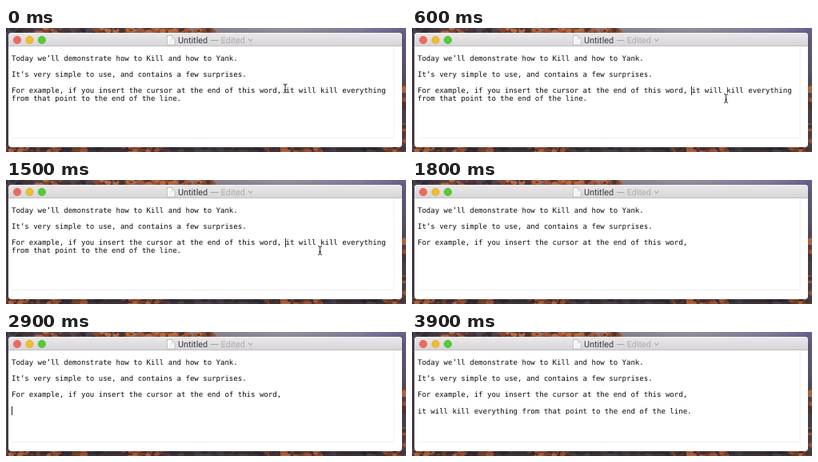
Animation, 500 px wide and 155 px high, one loop 4000 ms. Source, as an HTML page:

```html
<!DOCTYPE html>
<html lang="en">
<head>
<meta charset="utf-8">
<title>Kill and Yank</title>
<style>
  html, body { margin: 0; width: 100%; height: 100%; overflow: hidden; background: #37353f; }
  svg { display: block; width: 500px; height: 155px; }
  text { text-rendering: geometricPrecision; }
  #page { font: 9.04px "DejaVu Sans Mono", monospace; fill: #0a0a0a; }
  #title { font: 10.8px Roboto, Inter, sans-serif; }
</style>
</head>
<body>
<svg viewBox="0 0 500 155" xmlns="http://www.w3.org/2000/svg">
  <defs>
    <linearGradient id="sky">
      <stop offset="0" stop-color="#4b4354"/>
      <stop offset=".15" stop-color="#51434b"/>
      <stop offset=".5" stop-color="#85808a"/>
      <stop offset=".7" stop-color="#938c9b"/>
      <stop offset=".88" stop-color="#82799a"/>
      <stop offset="1" stop-color="#69608a"/>
    </linearGradient>
    <linearGradient id="side" x2="0" y2="1">
      <stop offset="0" stop-color="#69608a"/>
      <stop offset=".35" stop-color="#5d5472"/>
      <stop offset=".6" stop-color="#4a3f4b"/>
      <stop offset="1" stop-color="#50424a"/>
    </linearGradient>
    <linearGradient id="bar" x2="0" y2="1">
      <stop offset="0" stop-color="#ebe9eb"/>
      <stop offset="1" stop-color="#d5d3d5"/>
    </linearGradient>
    <filter id="soft" x="-5%" y="-10%" width="110%" height="125%">
      <feGaussianBlur stdDeviation="3"/>
    </filter>
    <path id="beam" d="M-2.5-5.500q2.500 0 2.500 2q0-2 2.500-2M0-4V4M-2.500 5.500q2.500 0 2.500-2q0 2 2.500 2M-1.500 2h3"/>
  </defs>

  <rect width="500" height="155" fill="url(#sky)"/>
  <rect y="145" width="500" height="10" fill="#403840"/>
  <rect width="5" height="155" fill="#4b4350"/>
  <rect x="490" width="10" height="155" fill="url(#side)"/>
  <g id="leaves"></g>
  <rect x="3" y="9" width="492" height="143" rx="4" opacity=".3" filter="url(#soft)"/>

  <path d="M3 23V10q0-4 4-4H491q4 0 4 4V145q0 4-4 4H7q-4 0-4-4Z" fill="#fff"/>
  <path d="M3 23V10q0-4 4-4H491q4 0 4 4V23Z" fill="url(#bar)"/>
  <path d="M3 22.500H495" stroke="#c3c1c3"/>
  <path d="M6 6.500H492" stroke="#f5f4f5"/>
  <g stroke-width=".6">
    <circle cx="14" cy="15" r="4.700" fill="#ed6a5d" stroke="#d5584c"/>
    <circle cx="29.500" cy="15" r="4.700" fill="#f0bd30" stroke="#d6a328"/>
    <circle cx="44.800" cy="15" r="4.700" fill="#54cb35" stroke="#43b02a"/>
  </g>
  <path d="M201.500 9.500h6l3.500 3.500v8h-9.500z" fill="#fff" stroke="#b4b4b4" stroke-width=".8"/>
  <path d="M207.500 9.500v3.500h3.500" fill="#eee" stroke="#b4b4b4" stroke-width=".7"/>
  <path d="M203.500 14.500h5.500m-5.500 2h5.500m-5.500 2h5.500" stroke="#d6d6d6" stroke-width=".6"/>
  <g id="title">
    <text x="215" y="18.800" fill="#3c3b3c">Untitled</text>
    <text x="268.800" y="18.800" fill="#adabad">Edited</text>
  </g>
  <path d="M256 15.500h9.500" stroke="#a5a4a5"/>
  <path d="M303 13.700l2.700 2.700 2.700-2.700" fill="none" stroke="#adabad" stroke-width="1.100"/>
  <path d="M485 23V137.500H8" fill="none" stroke="#dcdcdc" stroke-dasharray="1 1"/>

  <g id="page">
    <text x="7" y="41">Today we’ll demonstrate how to Kill and how to Yank.</text>
    <text x="7" y="61">It’s very simple to use, and contains a few surprises.</text>
    <text x="7" y="81">For example, if you insert the cursor at the end of this word,<tspan id="tail"> it will kill everything</tspan></text>
    <text id="wrap" x="7" y="91">from that point to the end of the line.</text>
    <text id="yank" x="7" y="101.500">it will kill everything from that point to the end of the line.</text>
  </g>
  <rect id="caret" width="1" height="11" fill="#222"/>
  <g id="mouse" fill="none">
    <use href="#beam" stroke="#fff" stroke-width="2.200" opacity=".8"/>
    <use href="#beam" stroke="#25252c"/>
  </g>
</svg>
<script>
const LOOP = 4000, KILL = 1700, RETURN = 2900, YANK = 3100;
const BLINKS = [[300, 850], [1300, KILL], [2100, 2500], [RETURN, 3600]];
const el = id => document.getElementById(id);
const show = (id, on) => el(id).setAttribute("visibility", on ? "visible" : "hidden");

let seed = 11;
const rand = () => (seed = seed * 16807 % 2147483647) / 2147483647;

// Autumn foliage: clusters of small angular patches.
function foliage(x, y, w, h, count, tones) {
  let out = "";
  for (let i = 0; i < count; i++) {
    const cx = x + rand() * w, cy = y + rand() * h, r = 1.5 + rand() * 3;
    const pts = [0, 1, 2, 3, 4].map(k => {
      const a = k * Math.PI * 0.4, d = r * (0.6 + rand() * 0.7);
      return (cx + d * 1.4 * Math.cos(a)).toFixed(1) + "," + (cy + d * Math.sin(a)).toFixed(1);
    });
    out += `<polygon points="${pts.join(" ")}" fill="${tones[i % tones.length]}"/>`;
  }
  return out;
}
const warm = ["#a9573a", "#bd6a41", "#83492f", "#4c3638"];
const dark = ["#332d36", "#4d444f", "#463438"];
el("leaves").innerHTML =
  foliage(0, 0, 180, 6, 50, dark) + foliage(36, 0, 40, 6, 16, warm) +
  foliage(100, 0, 75, 6, 22, warm) + foliage(178, 0, 82, 6, 46, warm) +
  foliage(0, 149, 500, 6, 90, dark) + foliage(0, 149, 100, 6, 34, warm) +
  foliage(145, 149, 55, 6, 20, warm) + foliage(325, 149, 70, 6, 24, warm) +
  foliage(470, 149, 28, 6, 12, warm) + foliage(497, 75, 3, 72, 14, warm);

function draw(t) {
  const killed = t >= KILL, lower = t >= RETURN, yanked = t >= YANK;
  show("tail", !killed);
  show("wrap", !killed);
  show("yank", yanked);

  show("caret", BLINKS.some(([a, b]) => t >= a && t < b));
  el("caret").setAttribute("x", lower && !yanked ? 7 : 349);
  el("caret").setAttribute("y", lower ? 93 : 73);

  const p = Math.min(1, Math.max(0, (t - 150) / 350));
  const e = p * p * (3 - 2 * p);
  show("mouse", !killed);
  el("mouse").setAttribute("transform", `translate(${349 + 43.5 * e} ${75.5 + 12.5 * e})`);
}

const start = performance.now();
function tick() {
  draw((performance.now() - start) % LOOP);
  requestAnimationFrame(tick);
}
draw(0);
requestAnimationFrame(tick);
</script>
</body>
</html>
```
